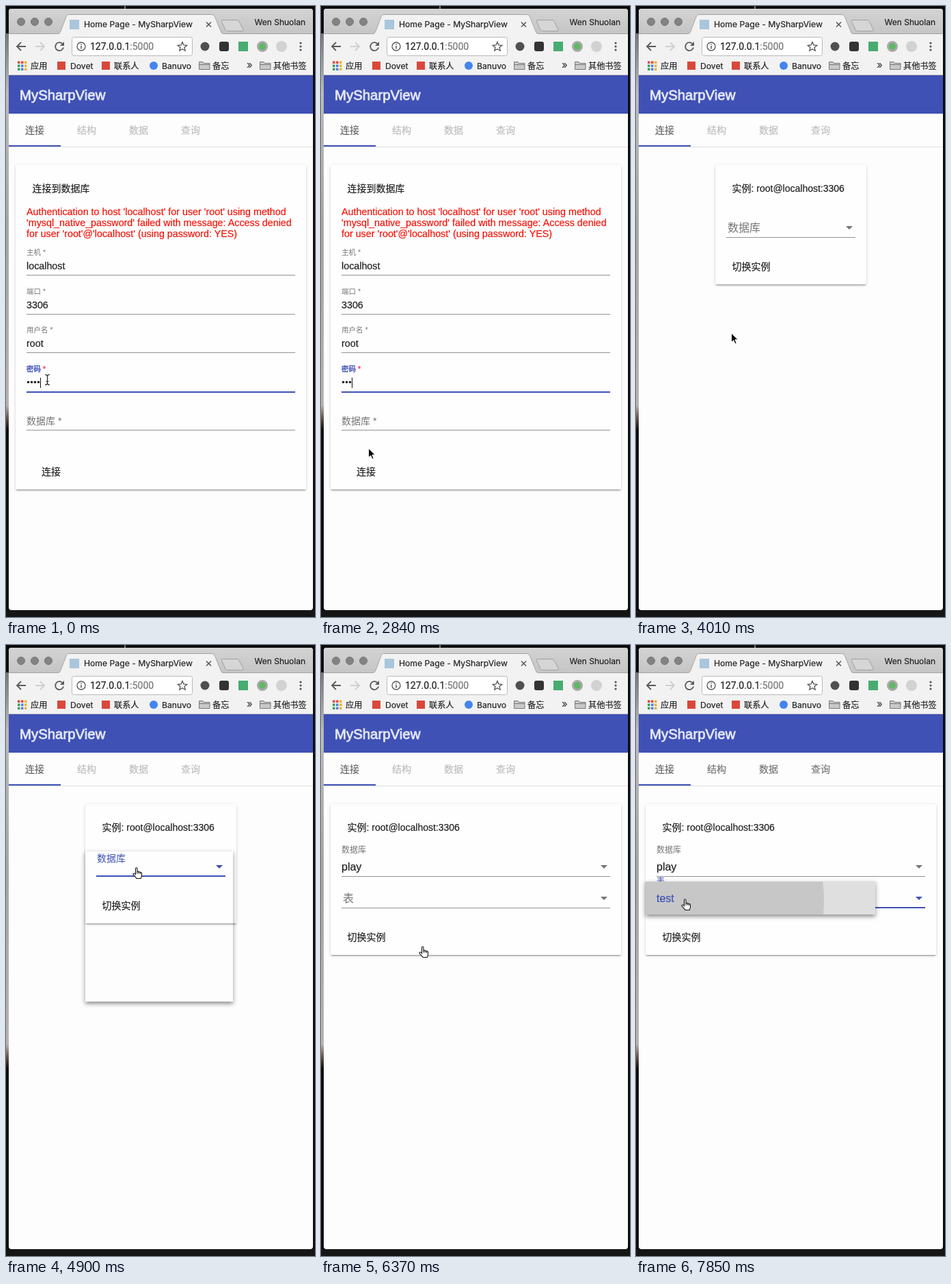
Animation, 452 px wide and 891 px high, one loop 8 s. Source, as an HTML page:

```html
<!DOCTYPE html>
<html lang="zh">
<head>
<meta charset="utf-8">
<title>MySharpView</title>
<style>
html, body { margin: 0; width: 100%; height: 100%; overflow: hidden; background: #0b0b0b; }
svg, .box { position: absolute; left: 0; top: 0; }
svg { width: 452px; height: 891px; }
text { font-family: "Liberation Sans", "Noto Sans CJK SC", "Noto Sans CJK", sans-serif; white-space: pre; }
.ui { font-family: Inter, "Noto Sans CJK SC", "Noto Sans CJK", sans-serif; }
.url { font-family: Roboto, sans-serif; }
#card { background: #fefefe; border-radius: 2px;
  box-shadow: 0 3px 1px -2px rgba(0,0,0,.2), 0 2px 2px rgba(0,0,0,.14), 0 1px 5px rgba(0,0,0,.12); }
#panel { overflow: hidden;
  box-shadow: 0 5px 5px -3px rgba(0,0,0,.2), 0 3px 7px 1px rgba(0,0,0,.2), 0 2px 5px 1px rgba(0,0,0,.12); }
</style>
</head>
<body>
<svg id="base">
  <defs>
    <linearGradient id="desk" x1="0" y1="0" x2="0" y2="1">
      <stop offset="0" stop-color="#777"/><stop offset=".15" stop-color="#bbb"/>
      <stop offset=".5" stop-color="#a5a5a3"/><stop offset=".94" stop-color="#b5b3b0"/>
      <stop offset=".97" stop-color="#6b5548"/><stop offset="1" stop-color="#111"/>
    </linearGradient>
    <linearGradient id="strip" x1="0" y1="0" x2="0" y2="1">
      <stop offset="0" stop-color="#d3d3d3"/><stop offset="1" stop-color="#c5c5c5"/>
    </linearGradient>
  </defs>
  <rect width="452" height="891" fill="#0b0b0b"/>
  <rect y="40" width="6" height="577" fill="url(#desk)"/>
  <rect x="173" width="2" height="4" fill="#777"/>
  <rect y="881" width="452" height="10" fill="#151515"/>
  <rect x="4" y="4" width="445" height="877" rx="4" fill="#fdfdfd"/>
  <path d="M4 41V8Q4 4 8 4H445Q449 4 449 8V41Z" fill="url(#strip)"/>
  <g fill="#838383" stroke="#747474"><circle cx="22" cy="23" r="5.5"/><circle cx="42" cy="23" r="5.5"/><circle cx="62" cy="23" r="5.5"/></g>
  <rect x="4" y="41" width="445" height="59" fill="#f2f2f2"/>
  <path d="M4 40.500H76Q79 40 80 37L88 16Q89 12.500 92 12.500H301Q304 12.500 305.500 16L314 37Q315 40.500 318 40.500H449" fill="none" stroke="#a3a3a3"/>
  <path d="M77 41Q79 40 80.500 37L88.500 16Q89.500 13 92 13H301Q303.500 13 305 16L313.500 37Q314.500 40 317 41Z" fill="#f2f2f2"/>
  <path d="M317 20.500H338Q340 20.500 341 22.500L347 34Q348 36.500 345.500 36.500H325Q322 36.500 321 34.500L315.500 23Q314.500 20.500 317 20.500Z" fill="#d6d6d6" stroke="#a0a0a0"/>
  <rect x="93" y="20" width="14" height="14" fill="#a9c6dc"/>
  <path d="M293 23.500L300 30.500M300 23.500L293 30.500" stroke="#555" stroke-width="1.500"/>
  <g fill="none" stroke="#5a5a5a" stroke-width="1.800">
    <path d="M29 59H16.500M22 53L16 59L22 65"/>
    <path d="M43 59H55.500M50 53L56 59L50 65" stroke="#cfcfcf"/>
    <path d="M82.500 55A6 6 0 1 0 84 60.500"/>
  </g>
  <path d="M85 52V58H79Z" fill="#5a5a5a"/>
  <rect x="96.500" y="45.500" width="176" height="27" rx="3" fill="#fff" stroke="#b9b9b9"/>
  <circle cx="110" cy="59" r="6" fill="none" stroke="#555" stroke-width="1.300"/>
  <path d="M110 58V62.500M110 55.200V56.700" stroke="#555" stroke-width="1.500"/>
  <path d="M258 52.500L259.900 57L264.700 57.400L261 60.500L262.200 65.200L258 62.700L253.800 65.200L255 60.500L251.300 57.400L256.100 57Z" fill="none" stroke="#555" stroke-width="1.300"/>
  <circle cx="291" cy="59" r="6.500" fill="#505050"/>
  <rect x="312" y="52" width="14" height="14" rx="3" fill="#333"/>
  <rect x="340" y="52" width="14" height="14" fill="#48ac70"/>
  <circle cx="375" cy="59" r="6.500" fill="#62b765" stroke="#a9a9a9" stroke-width="3"/>
  <circle cx="403" cy="59" r="8" fill="#d2d2d2"/>
  <g fill="#555"><circle cx="431" cy="54" r="1.600"/><circle cx="431" cy="59" r="1.600"/><circle cx="431" cy="64" r="1.600"/></g>
  <g id="apps"></g>
  <rect x="75" y="81" width="12" height="12" fill="#d9483b"/>
  <rect x="140" y="81" width="12" height="12" fill="#d9483b"/>
  <circle cx="216" cy="87" r="6" fill="#4484f0"/>
  <g id="folders" fill="#c9c9c9" stroke="#777"></g>
  <path d="M4 100.500H449" stroke="#c4c4c4"/>
  <rect x="4" y="101" width="445" height="56" fill="#3f51b5"/>
  <path d="M4 205.500H449" stroke="#e0e0e0"/>
  <rect x="4" y="203" width="76" height="2" fill="#3f51b5"/>
  <g id="labels"></g>
  <g id="tabs"></g>
</svg>
<div class="box" id="card"></div>
<svg id="form"></svg>
<div class="box" id="panel"></div>
<svg id="top"></svg>
<script>
const $ = id => document.getElementById(id);
const BLUE = '#3f51b5', INK = '#212121', GREY = '#757575';
const LOOP = 8000, STEPS = 54;

// a hairline stroke gives the slightly heavy text of the desktop
const text = (x, y, size, fill, str, extra = '', heavy = .2) =>
  `<text x="${x}" y="${y}" font-size="${size}" fill="${fill}" stroke="${fill}" stroke-width="${heavy}" ${extra}>${str}</text>`;
const span = (fill, str) => `<tspan fill="${fill}" stroke="${fill}">${str}</tspan>`;
const line = (x1, x2, y, on) =>
  `<rect x="${x1}" y="${on ? y - 1 : y}" width="${x2 - x1}" height="${on ? 2 : 1}" fill="${on ? BLUE : '#949494'}"/>`;
const arrow = (x, y, on) =>
  `<path d="M${x - 5} ${y - 2}h10l-5 5z" fill="${on ? BLUE : GREY}"/>`;

function place(el, x, y, w, h) {
  Object.assign(el.style, { left: x + 'px', top: y + 'px', width: w + 'px', height: h + 'px' });
}

function drawStatic() {
  const hues = ['#e0493c', '#e0493c', '#f0b429', '#3c9d5b', '#4a7fe0', '#f0b429', '#3c9d5b', '#4a7fe0', '#f0b429'];
  $('apps').innerHTML = hues.map((c, i) =>
    `<rect x="${17 + i % 3 * 5}" y="${80.5 + Math.floor(i / 3) * 5}" width="3.500" height="3.500" fill="${c}"/>`).join('');
  $('folders').innerHTML = [282, 371].map(x =>
    `<path d="M${x + .5} 92.500V81.500h5.500l1.500 2h8.500v9zM${x + .5} 85.500h15.500"/>`).join('');
  const ui = 'class="ui"', url = 'class="url"';
  $('labels').innerHTML =
    text(114, 31, 12.2, '#222', 'Home Page - MySharpView', ui) +
    text(438, 28, 12, '#222', 'Wen Shuolan', ui + ' text-anchor="end"') +
    text(123, 64, 14, '#222', '127.0.0.1' + span('#777', ':5000'), url) +
    [[36, '应用'], [94, 'Dovet'], [158, '联系人'], [228, 'Banuvo'], [302, '备忘'], [391, '其他书签']]
      .map(([x, s]) => text(x, 91.5, 12.2, '#222', s, ui)).join('') +
    text(352, 91, 15, '#444', '»', ui) +
    text(20, 137, 20.4, '#e4e7f5', 'MySharpView', '', .8);
}

function loginForm(dots, caret, focus) {
  const field = (y, name, value) =>
    text(30, y - 29, 10.5, GREY, name + ' *', '', 0) + text(30, y - 8, 14.3, INK, value) + line(30, 423, y);
  let s = text(38.5, 271, 14, INK, '连接到数据库') +
    ["Authentication to host 'localhost' for user 'root' using method",
     "'mysql_native_password' failed with message: Access denied",
     "for user 'root'@'localhost' (using password: YES)"]
      .map((l, i) => text(30, 305 + 16 * i, 14.3, '#f61208', l)).join('') +
    field(392, '主机', 'localhost') + field(449, '端口', '3306') + field(505, '用户名', 'root') +
    text(30, 533, 10.5, focus ? BLUE : GREY, '密码 ' + span('#ff4081', '*'), '', focus ? .4 : 0);
  for (let i = 0; i < dots; i++) s += `<circle cx="${32.5 + 5 * i}" cy="548.500" r="1.800" fill="${INK}"/>`;
  if (caret) s += `<rect x="${30 + 5 * dots}" y="542" width="1" height="15" fill="#111"/>`;
  return s + line(30, 423, focus ? 563 : 562, focus) + text(30, 610, 14, GREY, '数据库 *', '', 0) + line(30, 423, 618) +
    text(52, 684, 14, INK, '连接', 'font-weight="500"');
}

// float: 0 = label resting in the field, 1 = label above it
function select(x, right, y, name, value, float, on) {
  const size = 16 - 4 * float;
  return text(x + 2 * (1 - float), y + size * .38 - 25 * float, size, on ? BLUE : GREY, name, '', 0) +
    text(x, y + 6, 16, INK, value) + arrow(right - 9, y, on) + line(x, right, y + 14, on);
}

// cursor keys: step, x, y; positions between keys are linear
const PATH = [
  [17, 60, 545], [18, 65, 590], [19, 69.5, 645], [20, 64, 671], [24, 64, 671], [25, 85, 640],
  [27, 139.5, 477], [29, 178, 355], [30, 185, 324], [36, 185, 324], [38, 172, 390],
  [40, 158, 459], [42, 158, 459], [46, 98, 379], [47, 93, 374], [49, 80, 372], [50, 66, 370], [53, 66, 370]
];
function cursorAt(k) {
  const i = PATH.findIndex(p => p[0] >= k);
  if (i < 1) return PATH[0].slice(1);
  const [a, b] = [PATH[i - 1], PATH[i]], u = (k - a[0]) / (b[0] - a[0]);
  return [a[1] + (b[1] - a[1]) * u, a[2] + (b[2] - a[2]) * u];
}

const SHAPES = {
  arrow: '<path d="M0 0V13.500L3.200 10.500L5.400 15.600L7.600 14.700L5.400 9.700H9.700Z" fill="#000" stroke="#fff"/>',
  hand: '<path d="M4.500 9.500V2.200Q4.500.7 5.700.7T7 2.200V6.500Q8.500 5.600 9.300 7Q10.800 6.200 11.500 7.600Q13.500 7 13.500 9V12Q13.300 14 12.200 16.500H6Q4.500 14 1.200 10.800Q.4 9.400 1.800 9T4.500 10.500ZM7 6.500V9.500M9.300 7V9.500M11.500 7.600V10" fill="#fff" stroke="#111" stroke-width="1.100"/>',
  beam: '<path d="M-3 -7.500Q0 -7.500 .5 -5.500Q1 -7.500 4 -7.500M.5 -5.500V5.500M-3 7.500Q0 7.500 .5 5.500Q1 7.500 4 7.500M-1.500 2.500H2.500" fill="none" stroke="#222" stroke-width="1.200"/>'
};
function cursor(k) {
  if (k > 0 && k < 17) return '';
  const kind = k < 18 ? 'beam' : k < 20 || k > 23 && k < 30 ? 'arrow' : 'hand';
  const [x, y] = cursorAt(k);
  return `<g transform="translate(${x} ${y})">${SHAPES[kind]}</g>`;
}

const SCHEMAS = ['information_schema', 'mysql', 'performance_schema', 'play', 'test'];
function menu(x, y, w, items, k) {
  place($('panel'), x, y, w, 48 * items.length);
  const hover = Math.floor((cursorAt(k)[1] + 1 - y) / 48);
  return items.map((name, i) => {
    const top = y + 48 * i;
    return (i === hover ? `<rect x="${x}" y="${top}" width="${w}" height="48" fill="#f2f2f2"/>` : '') +
      text(x + 16, top + 30, 16, INK, name);
  }).join('');
}

const countDots = k => k < 5 ? [4, 3, 2, 2, 1][k] : k < 7 ? 0 : k < 9 ? 1 : k < 11 ? 2 : 3;

function render(k) {
  const tabOff = k < 53 ? '#bdbdbd' : GREY;
  $('tabs').innerHTML = ['连接', '结构', '数据', '查询']
    .map((s, i) => text(28 + 76 * i, 186, 14, i ? tabOff : '#666', s)).join('');

  const panel = $('panel');
  let form, top = '', open = false;
  if (k < 24) {
    place($('card'), 14, 232, 425, 473);
    form = loginForm(countDots(k), k < 22 && k !== 15 && k !== 16, k < 22);
  } else {
    const wide = k >= 43, x = wide ? 30 : 132, right = wide ? 423 : 321;
    place($('card'), x - 16, 232, right - x + 32, wide ? 220 : 174);
    const float = k < 33 ? 0 : k === 33 ? .5 : 1;
    form = text(x + 8.5, 271, 14, INK, '实例: root@localhost:3306') +
      select(x, right, 323, '数据库', k >= 42 ? 'play' : '', float, k === 32 || k === 33) +
      text(x + 8.5, wide ? 431 : 385, 14, INK, '切换实例', 'font-weight="500"');
    if (wide) form += select(x, right, 369, '表', '', k < 48 ? 0 : k === 48 ? .5 : 1, k >= 46);
    open = k >= 33 && k < 42 || k >= 48;
    panel.style.background = k === 33 || k === 48 ? 'transparent' : '#fefefe';
    if (k === 33) place(panel, 115.5, 301, 216.5, 219);
    else if (k === 48) place(panel, 14, 345, 332, 44);
    else if (k > 33 && k < 42) top = menu(116, 299, 220, SCHEMAS, k);
    else if (k > 48 && k < 53) top = menu(14, 345, 336, ['test'], k);
    else if (k === 53) {
      place(panel, 14, 345, 336, 48);
      top = '<rect x="14" y="345" width="336" height="48" fill="#dfdfdf"/>' +
        '<clipPath id="row"><rect x="14" y="345" width="336" height="48"/></clipPath>' +
        '<circle cx="71" cy="373" r="204" fill="#c7c7c7" clip-path="url(#row)"/>' +
        text(30, 375, 16, BLUE, 'test');
    }
  }
  panel.style.display = open ? 'block' : 'none';
  $('form').innerHTML = form;
  $('top').innerHTML = top + cursor(k);
}

const start = performance.now();
let shown = -1;
function tick() {
  const t = (performance.now() - start) % LOOP;
  const k = Math.min(STEPS - 1, Math.floor((t + 10) * STEPS / LOOP));
  if (k !== shown) render(shown = k);
  requestAnimationFrame(tick);
}
drawStatic();
tick();
</script>
</body>
</html>
```
